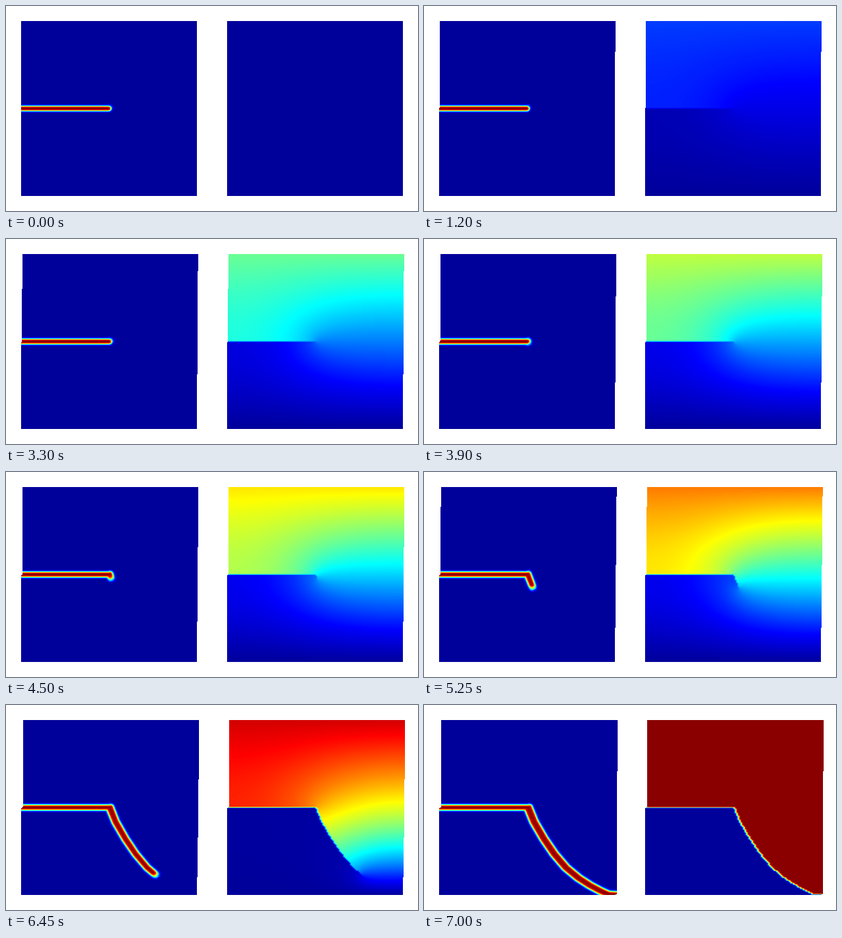
Recreate the animation shown at these times as a matplotlib script. Size 600 by 300 pixels, loop 7050 ms.

```python
import numpy as np
import matplotlib.pyplot as plt
from matplotlib.animation import FuncAnimation
from matplotlib.colors import LinearSegmentedColormap

FRAMES, STEP = 141, 50
SIZE, N = 256, 128            # panel side in pixels, mesh nodes per side
PAD, GAP = 22, 300            # panel margin, distance between panels
SHIFT = 3.5                   # largest sideways displacement in pixels
GROW_FROM = 60                # step at which the crack starts to move

jet = LinearSegmentedColormap.from_list("jet_soft", [
    (0, (0, 0, 0.61)), (0.111, (0, 0, 1)), (0.365, (0, 1, 1)),
    (0.619, (1, 1, 0)), (0.873, (1, 0, 0)), (1, (0.545, 0, 0))], N=512)
jet.set_bad("white")

# Crack path after the notch, in panel coordinates
path = np.array([(128, 128), (136.5, 149), (151, 174), (166, 196), (183, 216),
                 (201, 231), (218, 242), (233, 250), (244, 255), (257, 255.6)])
NOTCH = path[0]
cx = np.linspace(NOTCH[0], 257, 220)
cy = np.interp(cx, path[:, 0], path[:, 1])
arc = np.r_[0, np.cumsum(np.hypot(np.diff(cx), np.diff(cy)))]


def project(x, y):
    """Distance to the path and arc length of the closest point."""
    d2 = (x[..., None] - cx) ** 2 + (y[..., None] - cy) ** 2
    return np.sqrt(d2.min(-1)), arc[d2.argmin(-1)]


def smooth(v):
    v = np.clip(v, 0, 1)
    return v * v * (3 - 2 * v)


def crack_length(k):
    return 65 * np.exp((k * STEP - 6000) / 705)


def damage_along(s, k):
    return smooth((crack_length(k) + 6 - s) / 13)


def profile(r, width):
    return np.exp(-(r / width) ** 2.7)


# Mesh nodes and the links that cross the crack
node = np.linspace(0, SIZE, N)
gx, gy = np.meshgrid(node, node)
below = gy > np.interp(gx, cx, cy, left=NOTCH[1])


def crossing(a, b):
    x = (gx[a] + gx[b]) / 2
    y = (gy[a] + gy[b]) / 2
    return below[a] != below[b], x < NOTCH[0], project(x, y)[1]


ALL = slice(None)
links_x = crossing((ALL, slice(0, -1)), (ALL, slice(1, None)))
links_y = crossing((slice(0, -1), ALL), (slice(1, None), ALL))


def stiffness(links, k):
    cut, notch, s = links
    damage = np.where(notch, 1, damage_along(s, k))
    return np.where(cut, (1 - damage) ** 2 + 1e-6, 1.0)


def relax(u, k, steps):
    """Equilibrium of the sheared plate by conjugate gradients."""
    kx, ky = 1.4 * stiffness(links_x, k), stiffness(links_y, k)

    def force(v):
        out = np.zeros_like(v)
        f = kx * (v[:, 1:] - v[:, :-1])
        out[:, :-1] -= f
        out[:, 1:] += f
        f = ky * (v[1:] - v[:-1])
        out[:-1] -= f
        out[1:] += f
        out[0] = out[-1] = 0
        return out

    diag = np.zeros_like(u)
    diag[:, :-1] += kx
    diag[:, 1:] += kx
    diag[:-1] += ky
    diag[1:] += ky
    u = u.copy()
    r = -force(u)
    z = r / diag
    p = z
    rz = np.vdot(r, z)
    for _ in range(steps):
        if rz < 1e-8:
            break
        q = force(p)
        a = rz / np.vdot(p, q)
        u += a * p
        r -= a * q
        z = r / diag
        rz, old = np.vdot(r, z), rz
        p = z + rz / old * p
    return u


fields = [relax(1 - gy / SIZE, GROW_FROM, 600)]
for k in range(GROW_FROM + 1, FRAMES):
    fields.append(relax(fields[-1], k, 300))

# Pixel rows against mesh columns
pix = np.arange(SIZE) + 0.5
row = pix / SIZE * (N - 1)
top = row.astype(int)
frac = (row - top)[:, None]
rx, ry = np.meshgrid(node, pix)
kink_r, kink_s = project(rx, ry)
notch_r = np.hypot(np.maximum(rx - NOTCH[0] + 0.5, 0), ry - NOTCH[1])
span = np.arange(SIZE + 6) + 0.5


def damage(k):
    notch = profile(notch_r, 4 + 0.5 * k / (FRAMES - 1))
    kink = damage_along(kink_s, k) * profile(kink_r, 5)
    return np.maximum(notch, kink)


def displacement(k):
    u = fields[max(k - GROW_FROM, 0)]
    return (u[top] * (1 - frac) + u[top + 1] * frac) * k / (FRAMES - 1)


def render(k):
    img = np.full((300, 600), np.nan)
    d, u = damage(k), displacement(k)
    pos = node + SHIFT * u
    for j in range(SIZE):
        for x0, field in ((PAD, d), (PAD + GAP, u)):
            img[PAD + j, x0:x0 + len(span)] = np.interp(
                span, pos[j], field[j], left=np.nan, right=np.nan)
    return np.ma.masked_invalid(img)


fig = plt.figure(figsize=(6, 3), dpi=100, facecolor="white")
ax = fig.add_axes([0, 0, 1, 1])
ax.axis("off")
im = ax.imshow(render(0), cmap=jet, vmin=0, vmax=1, aspect="auto",
               interpolation="nearest")


def draw(k):
    im.set_data(render(k))
    return [im]


anim = FuncAnimation(fig, draw, frames=FRAMES, interval=STEP, repeat=True)
plt.show()
```
